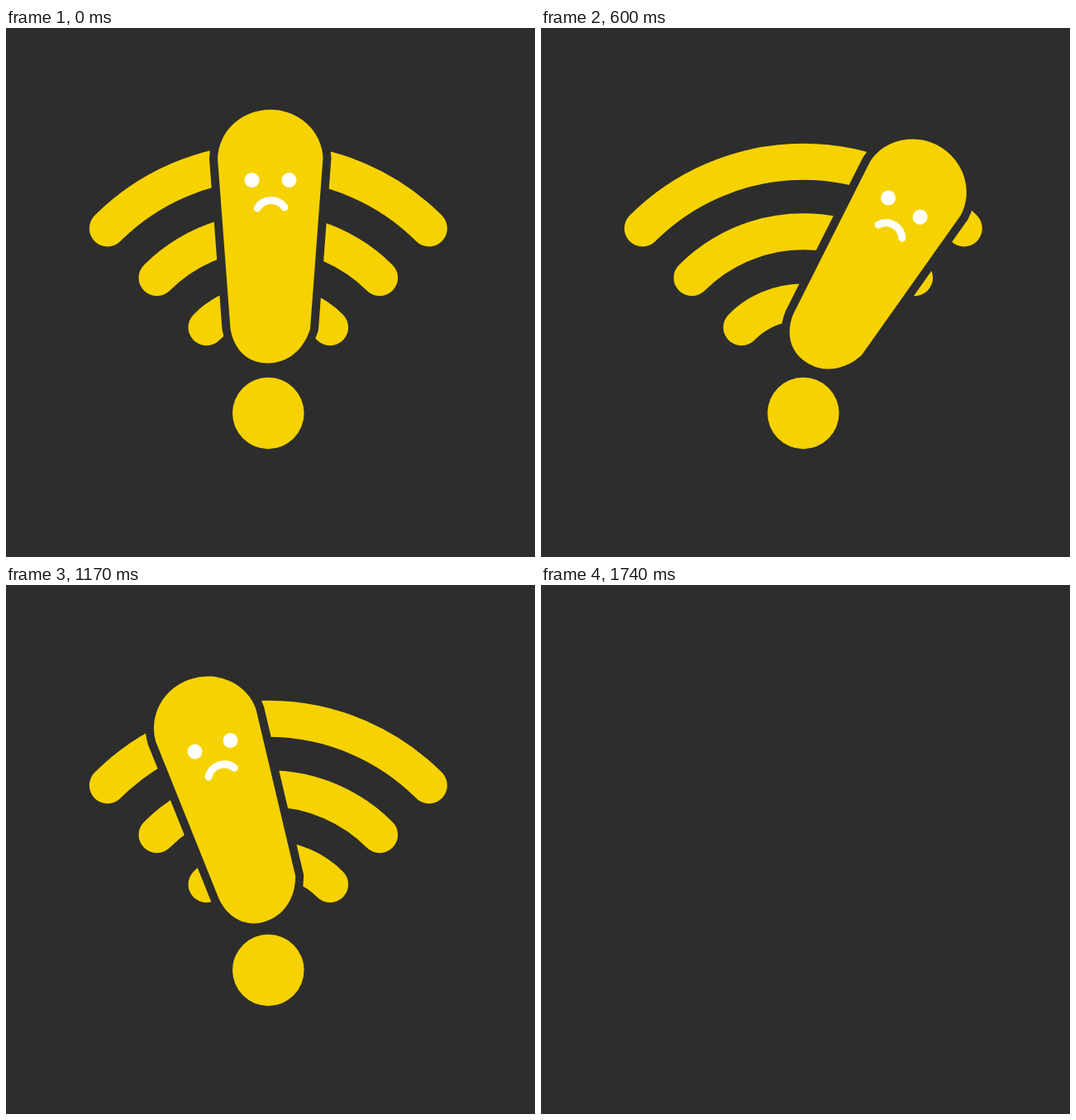
An HTML page for the animation above (1770 ms loop, 640x640 px).

```html
<!DOCTYPE html>
<html lang="en">
<head>
<meta charset="utf-8">
<title>No signal</title>
<style>
  html, body { margin: 0; width: 100%; height: 100%; overflow: hidden; background: #2d2d2d; }
  svg { display: block; width: 100%; height: 100%; }
  .line { fill: none; stroke-linecap: round; }
</style>
</head>
<body>
<svg viewBox="0 0 640 640">
  <g id="scene" fill="#f6d200">
    <g class="line" stroke="#f6d200" stroke-width="44">
      <path d="M122.8 242.4A275 275 0 0 1 511.8 242.4"/>
      <path d="M182.5 302.2A190.6 190.6 0 0 1 452.1 302.2"/>
      <path d="M242.5 362.2A105.8 105.8 0 0 1 392.1 362.2"/>
    </g>
    <g id="body">
      <path stroke="#2d2d2d" stroke-width="20" paint-order="stroke" stroke-linejoin="round"
        d="M256 157.5A63.8 61 0 0 1 383.5 157L368 364C360 390 340 406 316 405.5C290 405.5 275 386 271.5 364Z"/>
      <g fill="#fff">
        <circle cx="297.5" cy="184" r="9"/>
        <circle cx="342.5" cy="184" r="9"/>
      </g>
      <path class="line" stroke="#fff" stroke-width="9" d="M304 218A19.6 19.6 0 0 1 337 217"/>
    </g>
    <circle cx="317.3" cy="466" r="43.3"/>
  </g>
</svg>
<script>
  const LOOP = 1770, STEP = 30, BLANK = 1740;
  // [time in ms, angle in degrees], eased between keys
  const keys = [[0, 0], [711, 33.2], [1381, -33.2], [LOOP, 0]];
  const scene = document.getElementById('scene');
  const body = document.getElementById('body');

  const ease = x => x * x * (3 - 2 * x);

  function angleAt(t) {
    const i = keys.findIndex(k => t < k[0]);
    const [t0, a0] = keys[i - 1], [t1, a1] = keys[i];
    return a0 + (a1 - a0) * ease((t - t0) / (t1 - t0));
  }

  function draw() {
    const t = Math.floor(performance.now() % LOOP / STEP) * STEP;
    scene.setAttribute('visibility', t < BLANK ? 'visible' : 'hidden');
    body.setAttribute('transform', `rotate(${angleAt(t)} 320 415.6)`);
    requestAnimationFrame(draw);
  }
  draw();
</script>
</body>
</html>
```
